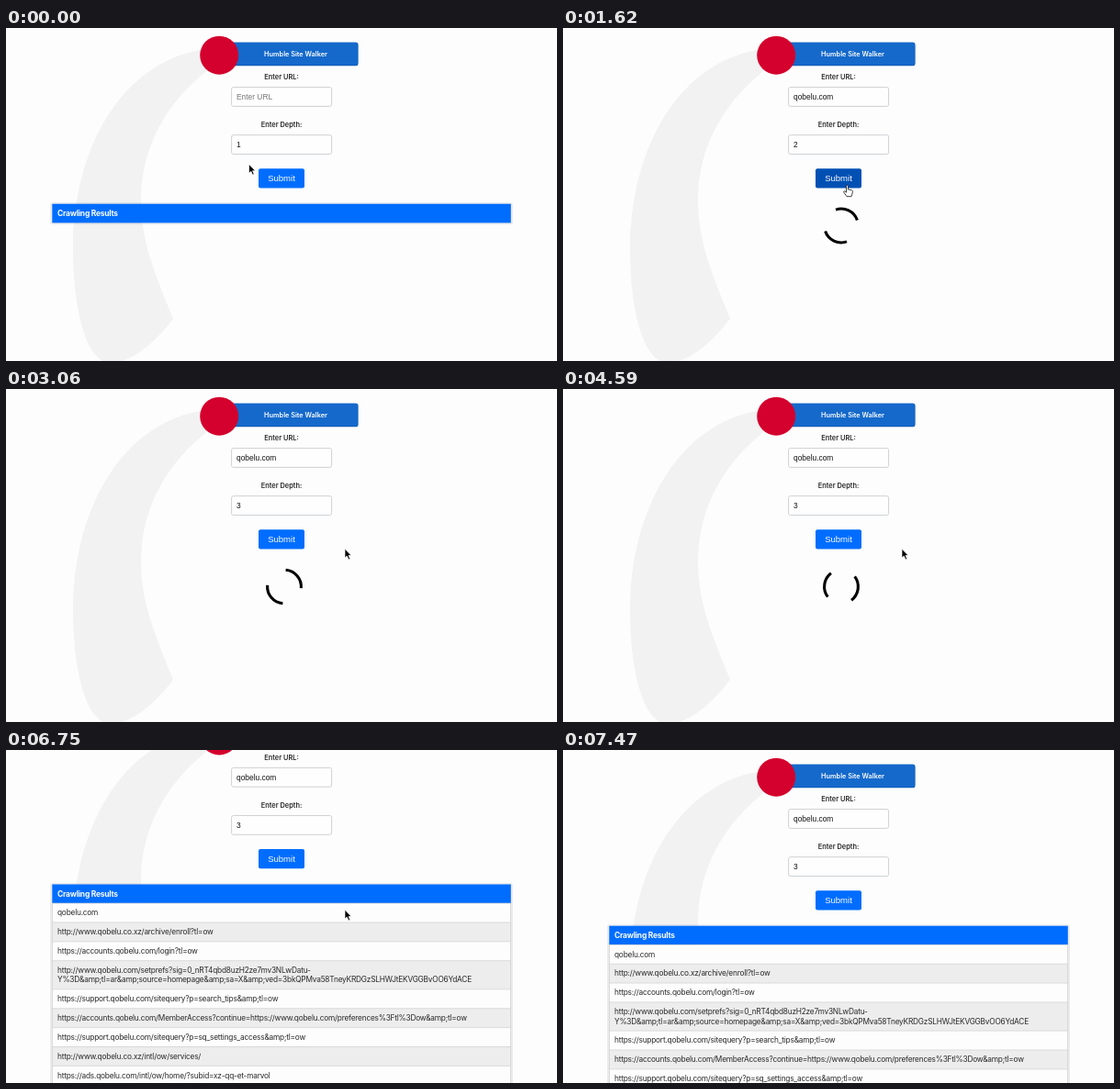
Recreate the animation shown at these times as an HTML page. Size 600 by 363 pixels, loop 7.56 s.

```html
<!DOCTYPE html>
<html lang="en">
<head>
<meta charset="utf-8">
<title>Crawler demo</title>
<style>
  html, body { margin: 0; width: 100%; height: 100%; overflow: hidden; background: #fdfdfd; }
  svg { display: block; width: 600px; height: 363px; }
  text { font-family: Inter, Roboto, sans-serif; fill: #2a2a2a; }
  .label { font-size: 7.4px; font-weight: 600; text-anchor: middle; }
  .title { font-size: 7.3px; font-weight: 600; text-anchor: middle; fill: #fff; }
  .head { font-size: 8.4px; font-weight: 700; fill: #fff; letter-spacing: -.19px; }
  .row text { font-size: 8.3px; letter-spacing: -.21px; }
  .field { font: 8.4px "Liberation Sans", Arial, sans-serif; fill: #111; }
  .submit { font: 9.5px "Liberation Sans", Arial, sans-serif; fill: #fff; text-anchor: middle; }
  .input { fill: #fefefe; stroke: #c9ccd0; stroke-width: .9; }
  .input.focus { stroke: #cf3148; }
</style>
</head>
<body>
<svg viewBox="0 0 600 363">
  <g id="page">
    <path fill="#f2f2f2" d="M216 23C120 38 73 140 73 240C73 310 88 365 114 365C138 364 160 345 182 317C165 275 147 235 147 188C147 130 175 80 222 44Z"/>
    <rect x="232" y="15.7" width="151.5" height="25.6" rx="2.2" fill="#0f57aa"/>
    <rect x="232" y="15.7" width="151.2" height="24.8" rx="2.2" fill="#1469cb"/>
    <circle cx="232.2" cy="29.7" r="21" fill="#d4002d"/>
    <text class="title" x="315.5" y="31">Humble Site Walker</text>

    <text class="label" x="300" y="56">Enter URL:</text>
    <rect id="urlBox" class="input" x="245.6" y="64.6" width="109" height="20.8" rx="2"/>
    <text id="url" class="field" x="251" y="77.9"></text>

    <text class="label" x="300" y="108">Enter Depth:</text>
    <rect id="depthBox" class="input" x="245.6" y="116.7" width="109" height="20.8" rx="2"/>
    <text id="depth" class="field" x="251" y="130"></text>
    <g id="stepper">
      <rect x="341.6" y="122.3" width="7.4" height="9.8" rx="1" fill="#e9e9e9"/>
      <path d="M343.5 126L345.3 123.7L347.1 126ZM343.5 128.5L345.3 130.8L347.1 128.5Z" fill="#444"/>
    </g>

    <rect id="button" x="275" y="153.2" width="50" height="21.4" rx="2"/>
    <text class="submit" x="300" y="167.2">Submit</text>

    <g id="table">
      <rect id="shadow" x="49.5" y="191.8" width="501" fill="none" stroke="#000" stroke-width="3" stroke-opacity=".07" rx="1"/>
      <rect x="50.3" y="191.7" width="499.5" height="20.7" fill="#006dff"/>
      <text class="head" x="56" y="205.1">Crawling Results</text>
      <g id="rows"></g>
      <rect id="frame" x="50.4" y="212.3" width="499.2" fill="none" stroke="#cfcfcf" stroke-width=".7"/>
    </g>

    <g id="spinner" fill="none" stroke="#000" stroke-width="3.1">
      <path id="arc"/>
      <path id="arcBack"/>
    </g>
  </g>
  <g id="cursor" stroke-linejoin="round">
    <path id="arrow" d="M0 0V9.8L2.3 7.8L4 11.6L5.7 10.9L4.1 7.2H7Z" fill="#000" stroke="#fff" stroke-width=".7"/>
    <path id="hand" d="M-1 .5C-1-.7.9-.7.9.5V4.2L4.6 5C5.6 5.2 6 6 5.9 7L5.2 10L4.5 12H-.5L-3.6 7.6C-4.4 6.2-3 5.6-2.2 6.4L-1 7.6Z" fill="#fff" stroke="#111" stroke-width=".8"/>
  </g>
</svg>
<script>
const LOOP = 7560, STEP = 90;
const SITE = 'qobelu.com';
const ROW_H = 20.88, TABLE_TOP = 212.3, WRAP_ROW = 3, LINE_H = 10.3;
const links = [
  SITE,
  'http://www.qobelu.co.xz/archive/enroll?tl=ow',
  'https://accounts.qobelu.com/login?tl=ow',
  'http://www.qobelu.com/setprefs?sig=0_nRT4qbd8uzH2ze7mv3NLwDatu-\n' +
    'Y%3D&amp;tl=ar&amp;source=homepage&amp;sa=X&amp;ved=3bkQPMva58TneyKRDGzSLHWJtEKVGGBvOO6YdACE',
  'https://support.qobelu.com/sitequery?p=search_tips&amp;tl=ow',
  'https://accounts.qobelu.com/MemberAccess?continue=https://www.qobelu.com/preferences%3Ftl%3Dow&amp;tl=ow',
  'https://support.qobelu.com/sitequery?p=sq_settings_access&amp;tl=ow',
  'http://www.qobelu.co.xz/intl/ow/services/',
  'https://ads.qobelu.com/intl/ow/home/?subid=xz-qq-et-marvol',
  'https://adkeeper.qobelu.com/home/',
  'https://blog.qobelu/articles/ads/',
  'https://fennilo.com/qobeluads',
  'https://www.ubavexo.com/qobeluads',
  'https://support.qobelu.com/?tl=ow',
  'https://developers.qobelu.com/?tl=ow',
  'https://partners.qobelu.com/?tl=ow'
];

// Key poses: [step, ...values]
const pointerKeys = [
  [0, 264.5, 148.5], [2, 262, 75], [7, 262, 75], [9, 305, 168], [12, 305, 168],
  [15, 346, 125], [16, 346, 125], [17, 309.5, 171.7], [20, 309.5, 171.7],
  [25, 335, 150], [28, 346, 125], [29, 346, 125], [30, 309.5, 171.7],
  [31, 309.5, 171.7], [33, 369, 174.3]
];
const scrollKeys = [[74, 0], [77, 174.5], [79, 174.5], [81.5, 0]];

const $ = id => document.getElementById(id);
const show = (id, on) => { $(id).style.display = on ? '' : 'none'; };
const within = (v, lo, hi) => v >= lo && v <= hi;
const rowTop = i => TABLE_TOP + i * ROW_H + (i > WRAP_ROW ? LINE_H : 0);

function add(parent, tag, attrs, text) {
  const node = document.createElementNS('http://www.w3.org/2000/svg', tag);
  for (const key in attrs) node.setAttribute(key, attrs[key]);
  if (text) node.textContent = text;
  return parent.appendChild(node);
}

function sample(keys, step) {
  if (step <= keys[0][0]) return keys[0].slice(1);
  for (let i = 1; i < keys.length; i++) {
    const a = keys[i - 1], b = keys[i];
    if (step <= b[0]) {
      const u = (step - a[0]) / (b[0] - a[0]), e = u * u * (3 - 2 * u);
      return a.slice(1).map((v, k) => v + (b[k + 1] - v) * e);
    }
  }
  return keys[keys.length - 1].slice(1);
}

const rows = links.map((link, i) => {
  const y = rowTop(i), h = rowTop(i + 1) - y;
  const row = add($('rows'), 'g', { class: 'row' });
  add(row, 'rect', { x: 50.3, y, width: 499.5, height: h, fill: i % 2 ? '#ededed' : '#fdfdfd' });
  add(row, 'path', { d: `M50.3 ${y}H549.8`, stroke: '#cfcfcf', 'stroke-width': i ? .7 : 0 });
  link.split('\n').forEach((line, k) =>
    add(row, 'text', { x: 56, y: y + 13.3 + k * LINE_H }, line));
  return row;
});

function arcPath(middle) {
  const point = deg => {
    const a = deg * Math.PI / 180;
    return `${303 + 18.4 * Math.cos(a)} ${215.5 + 18.4 * Math.sin(a)}`;
  };
  return `M${point(middle - 45)}A18.4 18.4 0 0 1 ${point(middle + 45)}`;
}

function rowCount(step) {
  if (step < 13) return 0;
  if (step < 22) return 1;
  return step < 73 ? 4 : links.length;
}

function draw(time) {
  const step = Math.floor((time % LOOP) / STEP);
  const loading = within(step, 10, 12) || within(step, 18, 21) || within(step, 32, 72);
  const [x, y] = sample(pointerKeys, step);
  const [scroll] = sample(scrollKeys, step);
  const hover = within(x, 275, 325) && within(y + scroll, 153, 174.6);
  const depthFocus = within(step, 15, 17) || within(step, 28, 31);
  const typed = SITE.slice(0, Math.max(0, (step - 2) * 2));

  $('page').setAttribute('transform', `translate(0 ${-scroll})`);
  $('url').textContent = typed || 'Enter URL';
  $('url').style.fill = typed ? '' : '#777';
  $('depth').textContent = step < 16 ? 1 : step < 29 ? 2 : 3;
  $('urlBox').classList.toggle('focus', within(step, 2, 8));
  $('depthBox').classList.toggle('focus', depthFocus);
  show('stepper', depthFocus);
  $('button').setAttribute('fill', hover ? '#0050b4' : '#006dff');

  const count = rowCount(step), bodyHeight = rowTop(count) - TABLE_TOP;
  show('table', !loading);
  rows.forEach((row, i) => { row.style.display = i < count ? '' : 'none'; });
  $('frame').setAttribute('height', bodyHeight);
  $('shadow').setAttribute('height', bodyHeight + 21);

  show('spinner', loading);
  const angle = 8 + (step - 51) * 24;
  $('arc').setAttribute('d', arcPath(angle));
  $('arcBack').setAttribute('d', arcPath(angle + 180));

  show('cursor', step < 82);
  show('arrow', !hover);
  show('hand', hover);
  $('cursor').setAttribute('transform', `translate(${x} ${y})`);
}

const start = performance.now();
function tick() {
  draw(performance.now() - start);
  requestAnimationFrame(tick);
}
tick();
</script>
</body>
</html>
```
